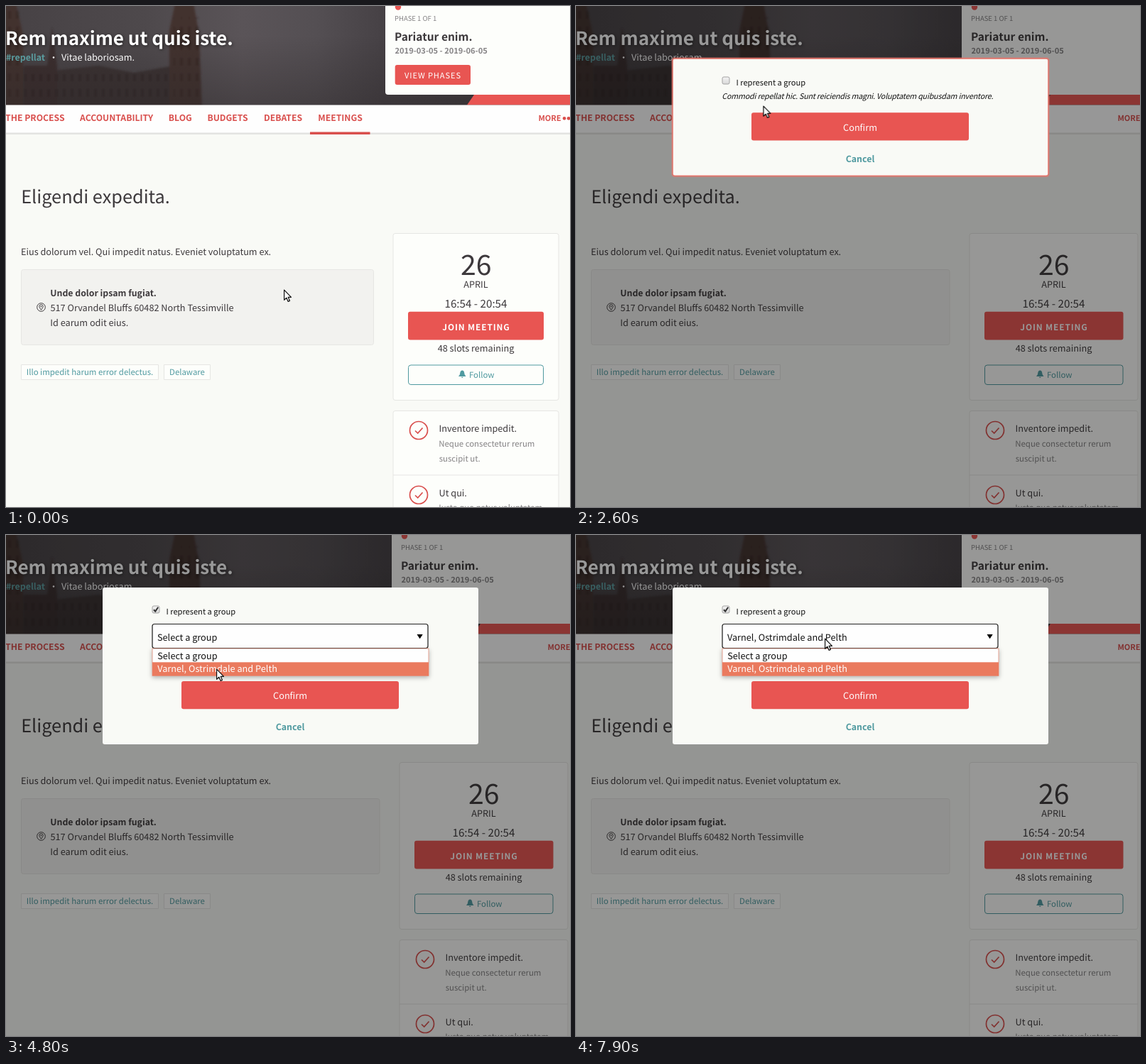
Recreate the animation shown at these times as an HTML page. Size 794 px wide and 706 px high, loop 8 s.

```html
<!DOCTYPE html>
<html lang="en">
<head>
<meta charset="utf-8">
<title>Join a meeting</title>
<style>
@property --wide { syntax: "<number>"; inherits: true; initial-value: 0; }
html, body { margin: 0; width: 100%; height: 100%; overflow: hidden; background: #f9faf6; }
svg {
  display: block; width: 794px; height: 706px;
  font: 12.7px "Noto Sans CJK JP", "Noto Sans CJK SC", "Noto Sans CJK", "Open Sans", sans-serif;
  text-rendering: geometricPrecision;
  --red: #e85552; --teal: #509aa0; --ink: #3d393c;
}
text { fill: var(--ink); white-space: pre; }
.b { font-weight: 700; }
.m { text-anchor: middle; }
.w { fill: #fff; }
.t { fill: var(--teal); }
.g { fill: #858385; }
.red { fill: var(--red); }
.nav text { fill: #d94f4d; font-weight: 700; }
.card { fill: #fdfefb; stroke: #e6e6e3; }
.note { font-size: 11.4px; }
.black text, text.k { fill: #111; }

/* every timed part runs on the same 8 s clock */
.a, .page { animation: 8s step-end infinite; }
.page { animation-name: page; }
.s { transform: translateX(calc(var(--wide) * var(--s) * 1px)); }
.grow { width: calc((var(--w) + var(--wide) * var(--d)) * 1px); }

@keyframes page { 0% { --wide: 0 } 18.75%, 100% { --wide: 1 } }
@keyframes hover {
  0%, 18.75%, 100% { fill: #e85552; stroke: none }
  12.5% { fill: #f06861; stroke: #f06861 }
}
@keyframes hand { 0%, 18.75%, 100% { opacity: 0 } 12.5% { opacity: 1 } }
@keyframes arrow { 0%, 18.75%, 100% { opacity: 1 } 12.5% { opacity: 0 } }
@keyframes dialog { 0% { opacity: 0 } 18.75%, 100% { opacity: 1 } }
@keyframes outline { 0% { opacity: 1 } 38.75%, 100% { opacity: 0 } }
@keyframes tall { 0% { height: 165px } 41.25%, 100% { height: 221px } }
@keyframes lower { 0% { transform: translateY(0) } 41.25%, 100% { transform: translateY(55.7px) } }
@keyframes group { 0% { opacity: 0 } 41.25%, 100% { opacity: 1 } }
@keyframes checked { 0% { opacity: 0 } 38.75%, 100% { opacity: 1 } }
@keyframes pressed { 0%, 43.75%, 80%, 100% { opacity: 0 } 38.75%, 73.75% { opacity: .22 } }
@keyframes focus { 0%, 73.75% { opacity: 0 } 50%, 96.25%, 100% { opacity: 1 } }
@keyframes list { 0%, 62.5% { opacity: 0 } 51.25%, 97.5%, 100% { opacity: 1 } }
@keyframes bar { 0% { transform: translateY(-19px) } 55%, 100% { transform: none } }
@keyframes first { 0% { fill: #fff } 55%, 100% { fill: #111 } }
@keyframes second { 0% { fill: #111 } 55%, 100% { fill: #fff } }
@keyframes before { 0% { opacity: 1 } 62.5%, 100% { opacity: 0 } }
@keyframes after { 0% { opacity: 0 } 62.5%, 100% { opacity: 1 } }

/* the pointer moves in 100 ms jumps */
.pointer { animation: move 8s steps(3, start) infinite; }
@keyframes move {
  0%, 6.25% { transform: translate(391px, 399px) }
  10% { transform: translate(465px, 412px) }
  13.75% { transform: translate(590px, 436px) }
  17.5% { transform: translate(655px, 447px) }
  22.5% { transform: translate(655px, 447px); animation-timing-function: steps(1, start) }
  23.75%, 25% { transform: translate(602px, 412px) }
  28.75% { transform: translate(500px, 318px) }
  32.5% { transform: translate(290px, 158px) }
  36.25% { transform: translate(210px, 104px); animation-timing-function: steps(1, start) }
  37.5% { transform: translate(209px, 105px) }
  43.75% { transform: translate(209px, 105px); animation-timing-function: steps(5, start) }
  50% { transform: translate(283px, 143px) }
  52.5% { transform: translate(283px, 143px); animation-timing-function: steps(2, start) }
  55% { transform: translate(287px, 164px); animation-timing-function: steps(1, start) }
  56.25% { transform: translate(289px, 182px) }
  57.5% { transform: translate(289px, 182px); animation-timing-function: steps(1, start) }
  58.75% { transform: translate(292px, 187px) }
  60% { transform: translate(292px, 187px); animation-timing-function: steps(1, start) }
  61.25% { transform: translate(296px, 188px) }
  65% { transform: translate(296px, 188px); animation-timing-function: steps(7, start) }
  73.75%, 85% { transform: translate(210px, 102px) }
  88.75%, 90% { transform: translate(255px, 121px) }
  93.75%, 100% { transform: translate(350px, 145px) }
}
</style>
</head>
<body>
<svg viewBox="0 0 794 706">
  <defs>
    <linearGradient id="sky">
      <stop offset="0" stop-color="#474245"/>
      <stop offset=".25" stop-color="#4e494c"/>
      <stop offset=".42" stop-color="#5a5458"/>
      <stop offset=".55" stop-color="#544f53"/>
      <stop offset=".67" stop-color="#464145"/>
      <stop offset="1" stop-color="#3b3639"/>
    </linearGradient>
    <linearGradient id="dusk" x2="0" y2="1">
      <stop offset=".3" stop-color="#2a2527" stop-opacity="0"/>
      <stop offset="1" stop-color="#2a2527" stop-opacity=".4"/>
    </linearGradient>
    <linearGradient id="box" x2="0" y2="1">
      <stop offset="0" stop-color="#f4f4f4"/>
      <stop offset="1" stop-color="#d8d8d8"/>
    </linearGradient>
    <pattern id="windows" width="11" height="22" patternUnits="userSpaceOnUse">
      <path d="M3 18V8q2-4 4 0V18Z" fill="#251d1e" opacity=".4"/>
    </pattern>
    <filter id="soft"><feGaussianBlur stdDeviation="1.5"/></filter>
    <filter id="shade" x="-5%" y="-20%" width="110%" height="160%">
      <feDropShadow dx="0" dy="2" stdDeviation="3" flood-opacity=".3"/>
    </filter>
    <clipPath id="line"><path d="M206 126H575V152.5H206Z"/></clipPath>
    <clipPath id="hero"><path d="M0 0H794V140H0Z"/></clipPath>
  </defs>

  <g class="page">
    <path fill="#f9faf6" d="M0 0H794V706H0Z"/>

    <g clip-path="url(#hero)">
      <path fill="url(#sky)" d="M0 0H794V140H0Z"/>
      <g filter="url(#soft)">
        <path fill="#3a3132" d="M0 80L58 92 130 84 180 94 236 84V143H0Z"/>
        <path fill="#43312f" d="M-4-4H14L24 40V143H-4ZM230 143V34L238-4H264L272 40 276 143Z"/>
        <path fill="#3a2e2e" d="M58 143V84L65 30 72 84V143ZM26 143V84H58V143Z"/>
        <path fill="url(#windows)" d="M0 0H20V139H0ZM26 96H230V139H26ZM236 16H272V139H236Z"/>
      </g>
      <path fill="url(#dusk)" d="M0 0H794V140H0Z"/>
      <path class="red s" style="--s:9" d="M649 139.500L659 125H800V139.500Z"/>
    </g>
    <text class="b w" x="-1" y="54.5" font-size="26.05" style="text-shadow:1px 1px 4px #0008">Rem maxime ut quis iste.</text>
    <text class="b" x="0" y="77" font-size="12.4" style="fill:#5a9c9f">#repellat</text>
    <circle class="w" cx="67" cy="72.500" r="1.3"/>
    <text class="w" x="78" y="77">Vitae laboriosam.</text>

    <g class="s" style="--s:9">
      <rect x="534" y="-8" width="290" height="133" rx="4" fill="#fdfefb"/>
      <circle class="red" cx="552" cy="1.500" r="4.200"/>
      <text class="g" x="547" y="21" font-size="9.5">PHASE 1 OF 1</text>
      <text class="b" x="547" y="48.500" font-size="15.5">Pariatur enim.</text>
      <text class="b g" x="547.500" y="67" font-size="11.1">2019-03-05 - 2019-06-05</text>
      <rect class="red" x="547.700" y="83" width="106.300" height="28" rx="3"/>
      <text class="w m" x="601" y="101.500" font-size="11.1" letter-spacing=".9">VIEW PHASES</text>
    </g>

    <g class="nav">
      <path fill="#fefefe" d="M0 139.500H794V179H0Z"/>
      <path fill="#e3e3e1" d="M0 178.500H794V181H0Z"/>
      <g font-size="12.2">
        <text x="82.500" y="162" text-anchor="end">THE PROCESS</text>
        <text class="m" x="155.500" y="162">ACCOUNTABILITY</text>
        <text class="m" x="245.300" y="162">BLOG</text>
        <text class="m" x="312" y="162">BUDGETS</text>
        <text class="m" x="390" y="162">DEBATES</text>
        <text class="m" x="470.500" y="162">MEETINGS</text>
      </g>
      <path fill="#d94f4d" d="M428 177.500H512.500V181H428Z"/>
      <g class="s" style="--s:13">
        <text class="m" x="765.500" y="162.300" font-size="11">MORE</text>
        <path fill="none" stroke="#d94f4d" stroke-width="4.800" stroke-linecap="round" stroke-dasharray="0 6" d="M786 158.300H799"/>
      </g>
    </g>

    <text x="21.200" y="278" font-size="25.3">Eligendi expedita.</text>
    <text x="21" y="350.500">Eius dolorum vel. Qui impedit natus. Eveniet voluptatum ex.</text>

    <rect class="grow" style="--w:496;--d:8.500" x="21.500" y="371.500" height="106" rx="3" fill="#f2f2ef" stroke="#e6e6e3"/>
    <g fill="none" stroke="#3d393c">
      <circle cx="49.500" cy="424.500" r="5.800"/>
      <path d="M49.500 428.300Q46.800 424.800 46.800 423.400A2.700 2.700 0 0 1 52.200 423.400Q52.200 424.800 49.500 428.300Z"/>
      <circle cx="49.500" cy="423.500" r=".6"/>
    </g>
    <text class="b" x="62.300" y="409" font-size="12.3">Unde dolor ipsam fugiat.</text>
    <text x="62.500" y="430">517 Orvandel Bluffs 60482 North Tessimville</text>
    <text x="62.300" y="451">Id earum odit eius.</text>

    <g class="note">
      <path class="card" d="M21.500 505.500H214.500V526.500H21.500ZM222.500 505.500H287.500V526.500H222.500Z"/>
      <text class="t m" x="118" y="520">Illo impedit harum error delectus.</text>
      <text class="t m" x="255" y="520">Delaware</text>
    </g>

    <g class="s" style="--s:9">
      <rect class="card grow" style="--w:233;--d:4" x="545" y="320.500" height="235" rx="3"/>
      <rect class="red grow a" style="--w:191;--d:4.500;animation-name:hover" x="566" y="430.700" height="39.700" rx="3"/>
      <rect class="grow" style="--w:190;--d:4.500" x="566.500" y="506" height="27.500" rx="3.500" fill="#fdfefb" stroke="#509aa0"/>
      <g class="s m" style="--s:2">
        <text x="661.800" y="379" font-size="39.200">26</text>
        <text x="661.500" y="397">APRIL</text>
        <text x="661.500" y="424.500" font-size="15.2">16:54 - 20:54</text>
        <text class="b w" x="662" y="456.500" font-size="11.85" letter-spacing=".9">JOIN MEETING</text>
        <text x="661.500" y="486.500">48 slots remaining</text>
        <text class="t note" x="669.700" y="524">Follow</text>
        <path class="t" d="M642.300 513.500C645.500 513.500 645.200 518 645.800 519.500L647.500 522H637L638.800 519.500C639.400 518 639 513.500 642.300 513.500ZM640.800 522.700H643.800Q642.300 525.500 640.800 522.700Z"/>
      </g>
      <rect class="card grow" style="--w:233;--d:4" x="545" y="570.500" height="150" rx="3"/>
      <rect class="grow" style="--w:233;--d:4" x="545" y="660.500" height="1" fill="#e6e6e3"/>
      <g id="tick" fill="none" stroke="#d94f4d" stroke-width="1.700">
        <circle cx="581" cy="598" r="12.500"/>
        <path d="M576 598.500L579.700 602 586.500 594.500"/>
      </g>
      <use href="#tick" y="91"/>
      <text x="609.500" y="600">Inventore impedit.</text>
      <text x="609.500" y="691">Ut qui.</text>
      <g class="note">
        <text class="g" x="609.300" y="621">Neque consectetur rerum</text>
        <text class="g" x="609.700" y="642">suscipit ut.</text>
        <text class="g" x="609.300" y="711">Iusto quo natus voluptatem</text>
      </g>
    </g>
  </g>

  <g class="a" style="animation-name:dialog">
    <path fill="#0a0a0a" opacity=".42" d="M0 0H794V706H0Z"/>
    <rect class="a" style="animation-name:tall" x="136" y="74" width="529" height="165" rx="3" fill="#f9faf6"/>
    <g class="a" style="animation-name:outline" fill="none" stroke="#e5746b">
      <rect x="135.500" y="73.500" width="530" height="166.500" rx="3" stroke-width="3" opacity=".35"/>
      <rect x="136" y="74" width="529" height="165.500" rx="3" stroke-width="1.300"/>
    </g>

    <rect x="206" y="100" width="10" height="10" rx="2" fill="url(#box)" stroke="#a3a3a3"/>
    <rect class="a" style="animation-name:pressed" x="205.500" y="99.500" width="11" height="11" rx="2"/>
    <path class="a" style="animation-name:checked" d="M208 105.300L210.200 107.600 214.200 101.800" fill="none" stroke="#333" stroke-width="2"/>
    <text class="k" x="225.500" y="111.500" font-size="11.1">I represent a group</text>

    <g class="a" style="animation-name:lower">
      <text class="k" x="205.300" y="131" font-size="10.7" font-style="italic" letter-spacing="-.18">Commodi repellat hic. Sunt reiciendis magni. Voluptatem quibusdam inventore.</text>
      <rect class="red" x="247" y="150.300" width="306" height="39.200" rx="3"/>
      <text class="w m" x="400" y="175.800">Confirm</text>
      <text class="b t m" x="400" y="219.800" font-size="12.4">Cancel</text>
    </g>

    <g class="a black" style="animation-name:group">
      <rect x="206" y="125.500" width="388" height="34" rx="3" fill="#fefefe" stroke="#dededb"/>
      <rect class="a" style="animation-name:focus" x="206" y="125.500" width="388" height="34" rx="3" fill="none" stroke="#222" stroke-width="1.200"/>
      <path d="M578.500 140H586.700L582.600 146.300Z"/>
      <g clip-path="url(#line)">
        <text class="a" style="animation-name:before" x="213" y="149.300">Select a group</text>
        <text class="a" style="animation-name:after" x="213" y="149.300">Varnel, Ostrimdale and Pelth</text>
      </g>
      <g class="a" style="animation-name:list">
        <rect x="206" y="160" width="389" height="38.500" fill="#fefefe" stroke="#d98a78" stroke-width=".8" filter="url(#shade)"/>
        <rect class="a" style="animation-name:bar" x="206" y="179.300" width="389" height="19" fill="#ea7a5e"/>
        <text class="a" style="animation-name:first" x="213.200" y="174.600">Select a group</text>
        <text class="a" style="animation-name:second" x="213.200" y="193.200">Varnel, Ostrimdale and Pelth</text>
      </g>
    </g>
  </g>

  <g class="pointer" fill="#fff" stroke="#111" stroke-width="1.200" stroke-linejoin="round">
    <path class="a" style="animation-name:arrow" d="M.6 1.200V15.300L3.900 12.200 6.200 17.400 8.500 16.400 6.200 11.300H10.500Z"/>
    <g class="a" style="animation-name:hand">
      <path d="M.6 8.300V1Q.6-.5 2-.5T3.400 1V5Q4.600 4 5.700 5.200 7 4.400 8 5.600 10.400 5 10.400 7.500 10.400 10.500 9 12.300V14H1.500V12.500Q-1 10.500-3 7.500-3.400 5.600-1.500 6.200Z"/>
      <path d="M3.400 5V7.500M5.700 5.500V7.500M8 6V8" stroke-width=".8"/>
    </g>
  </g>
</svg>
</body>
</html>
```
